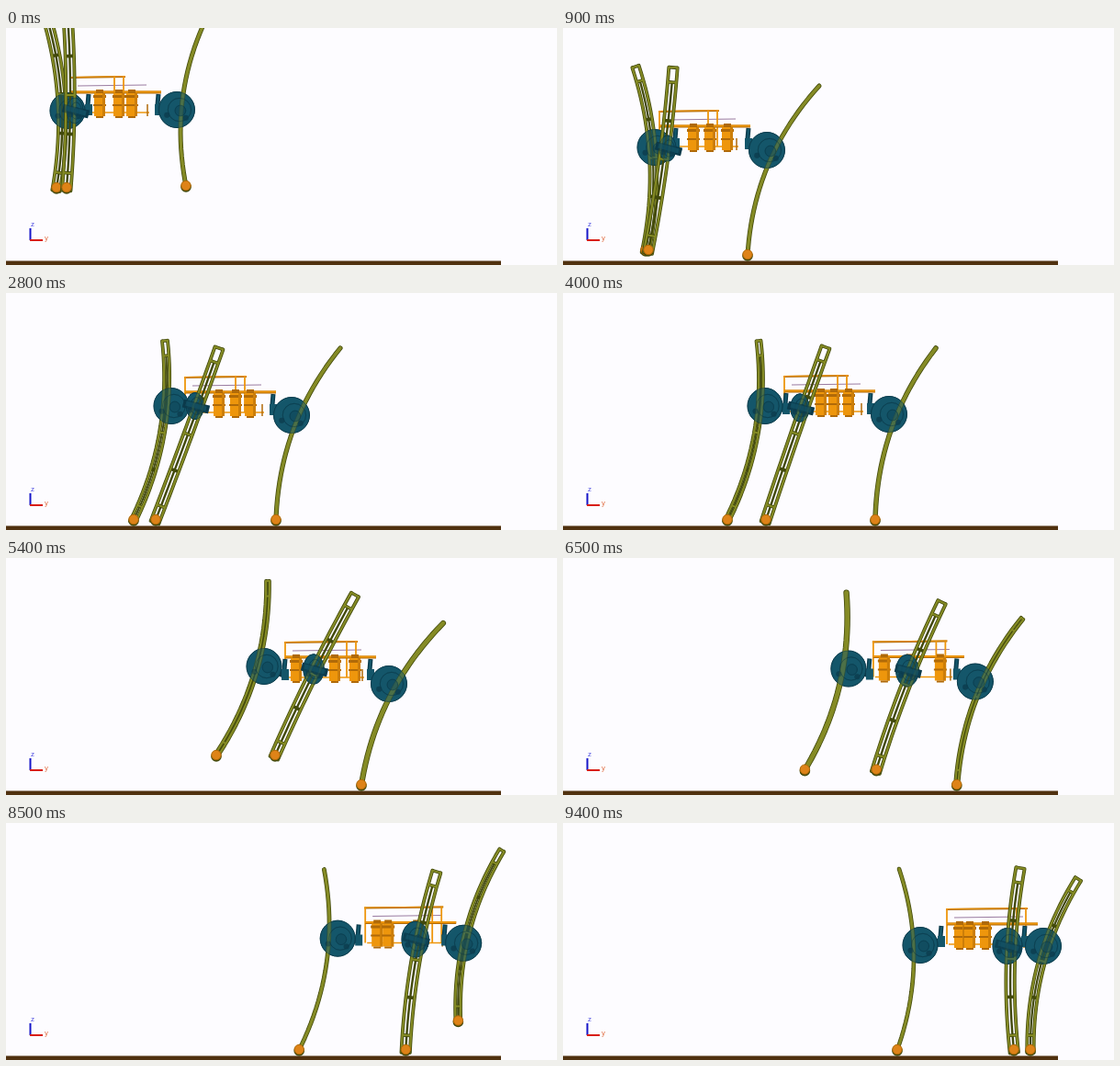
An HTML page with a canvas for the animation above (9.5 s loop, 600x258 px).

```html
<!DOCTYPE html>
<html>
<head>
<meta charset="utf-8">
<style>
html, body { margin: 0; width: 600px; height: 258px; overflow: hidden; background: #fdfcff; }
canvas { display: block; }
</style>
</head>
<body>
<canvas id="stage" width="600" height="258"></canvas>
<script>
const ctx = document.getElementById('stage').getContext('2d');
const LOOP = 9500, STEP = 100, GAIT = 1.2, GAIT_START = 2.8;
const ORANGE = '#ee960c', ORANGE_DARK = '#b06a08', TEAL = '#14566a', TEAL_DARK = '#0b3a4b';
const OLIVE = '#858b25', OLIVE_DARK = '#42490c';

// Poses at these seconds; the gait offsets fill in the strides between them.
const TIMES = [0, .9, 2.8, 4, 5.4, 7.6, 9.4];
const still = [0, 0, 0, 0, 0, 0];
const sway = [0, 26, 8, -20, -15, -7];
const hubSway = [0, 15, 6, -10, -10, -5];
const swingLift = [0, -32, -26, 0, 0, 0];
const hubBob = [0, -5, 3, 9, 4, 0];
const swingFootY = [174, 242, 247, 247, 215, 247, 247];

const legs = [
  { // rear
    topX: [[39, 79, 173, 213, 285, 329, 366], sway],
    topY: [[-28, 42, 52, 52, 25, 51, 50], swingLift],
    footX: [[55, 90, 139, 179, 229, 297, 364], [0, 4, 6, 6, -6, -8]],
    footY: [swingFootY, swingLift],
    hubX: [[67, 100, 180, 220, 281, 339, 389], hubSway],
    hubY: [[90, 130, 123, 123, 118, 124, 133], hubBob],
    bow: p => 13 + 4 * p, width: p => 12 - 8 * p, radius: () => 19
  },
  { // middle
    topX: [[66, 120, 232, 286, 380, 442, 498], sway],
    topY: [[-28, 43, 60, 59, 40, 57, 49], swingLift],
    footX: [[66, 93, 163, 221, 293, 392, 491], [0, 7, 24, 25, 10, 4]],
    footY: [swingFootY, swingLift],
    hubX: [[75, 114, 206, 258, 335, 413, 484], hubSway],
    hubY: [[90, 131, 123, 125, 121, 125, 134], hubBob],
    bow: p => 4 - 11 * p, width: () => 13, radius: p => 9 + 7 * p * p, bar: true
  },
  { // front
    topX: [[226, 279, 364, 406, 476, 521, 561], sway],
    topY: [[-26, 63, 60, 60, 71, 57, 61], [0, 11, 5, 0, -28, -24]],
    footX: [[196, 201, 294, 340, 387, 469, 509], [0, -4, -14, -22, -14, -2]],
    footY: [[172, 247, 247, 247, 247, 247, 247], [0, 0, 0, 0, -30, -26]],
    hubX: [[186, 222, 311, 355, 417, 479, 523], hubSway],
    hubY: [[89, 133, 133, 132, 137, 132, 134], [0, 5, 4, 2, -2, 0]],
    bow: p => -18 + 4 * p, width: p => 5 + 6 * p ** 3, radius: () => 19.5
  }
];
const body = {
  x: [[120, 155, 245, 291, 354, 420, 468], hubSway],
  y: [[70, 107, 108, 107, 108, 107, 110], still],
  rodEnd: [[10, 15, 17, 20, 29, 32, 38], still],
  motors: [
    [[-18, -13, -13, -10, -38, -38, -36], still],
    [[3, 5, 5, 4, 4, -25, -25], still],
    [[17, 24, 21, 20, 26, 20, -8], still]
  ]
};

function gait(offsets, t) {
  const u = (((t - GAIT_START) / GAIT) % 1 + 1) % 1 * 6;
  const i = Math.floor(u + 1e-6), f = u - i;
  const at = k => offsets[(i + k + 6) % 6];
  const [a, b, c, d] = [at(-1), at(0), at(1), at(2)];
  return b + f / 2 * (c - a + f * (2 * a - 5 * b + 4 * c - d + f * (3 * (b - c) + d - a)));
}

function value([poses, offsets], t, falling) {
  let i = 0;
  while (i < TIMES.length - 2 && t >= TIMES[i + 1]) i++;
  let f = (t - TIMES[i]) / (TIMES[i + 1] - TIMES[i]);
  if (falling && i === 0) f = Math.min(1, (t / .45) ** 2);
  const base = k => poses[k] - gait(offsets, TIMES[k]);
  return base(i) * (1 - f) + base(i + 1) * f + gait(offsets, t);
}

function line(points, width, color, cap = 'butt') {
  ctx.beginPath();
  for (const [x, y] of points) ctx.lineTo(x, y);
  ctx.lineWidth = width;
  ctx.strokeStyle = color;
  ctx.lineCap = cap;
  ctx.lineJoin = 'round';
  ctx.stroke();
}

function rect(x, y, w, h, color) {
  ctx.fillStyle = color;
  ctx.fillRect(x, y, w, h);
}

function ellipse(x, y, rx, ry, fill, stroke) {
  ctx.beginPath();
  ctx.ellipse(x, y, rx, ry, 0, 0, 7);
  if (fill) { ctx.fillStyle = fill; ctx.fill(); }
  if (stroke) { ctx.lineWidth = 1; ctx.strokeStyle = stroke; ctx.stroke(); }
}

function poseLeg(leg, t) {
  const p = t / 9.4, pose = { bow: leg.bow(p), width: leg.width(p), radius: leg.radius(p), bar: leg.bar };
  for (const key of ['topX', 'topY', 'footX', 'footY', 'hubX', 'hubY'])
    pose[key] = value(leg[key], t, key.endsWith('Y'));
  pose.footY = Math.min(247, pose.footY);
  return pose;
}

function drawHub(leg) {
  const { hubX: x, hubY: y, radius: r } = leg, ry = Math.min(19.5, r + 5);
  ellipse(x, y, r, ry, TEAL, TEAL_DARK);
  ellipse(x + r * .15, y, r * .65, ry * .65, null, TEAL_DARK);
  ellipse(x + r * .2, y + 1, r * .3, ry * .3, '#104a5d', TEAL_DARK);
  ellipse(x - r * .55, y + ry * .3, 3, 3, TEAL_DARK);
  ellipse(x + r * .5, y + ry * .45, 3, 3, TEAL_DARK);
  if (leg.bar) {
    line([[x - 13, y - 3], [x + 15, y + 4]], 9, TEAL_DARK);
    line([[x - 10, y - 3], [x + 12, y + 3]], 5, TEAL);
  }
}

function drawLeg(leg) {
  const { topX, topY, footX, footY, bow, width } = leg;
  const dx = footX - topX, dy = footY - topY, length = Math.hypot(dx, dy);
  const point = (s, side = 0) => {
    const b = bow * 4 * s * (1 - s), slope = bow * 4 * (1 - 2 * s);
    const tx = dx + slope * dy / length, ty = dy - slope * dx / length, n = Math.hypot(tx, ty);
    return [topX + dx * s + b * dy / length + side * ty / n,
            topY + dy * s - b * dx / length - side * tx / n];
  };
  const path = (side, from = 0, to = 1.015) =>
    Array.from({ length: 25 }, (_, i) => point(from + (to - from) * i / 24, side));
  const rail = (points, w) => {
    line(points, w, OLIVE_DARK, 'round');
    line(points, w - 1.6, OLIVE, 'round');
  };
  if (width < 6.5) {
    rail(path(0), Math.max(4.6, width));
  } else {
    const edge = width / 2 - 1.8;
    for (const s of [0, .08, .29, .5, .71, .92, 1.01])
      line([point(s, -edge), point(s, edge)], 3.6, OLIVE_DARK);
    line(path(0, .08, 1), Math.min(2.4, width / 5), OLIVE_DARK);
    rail(path(-edge), 3.8);
    rail(path(edge), 3.8);
    for (const s of [0, .08, .5, .92, 1.01])
      line([point(s, -edge), point(s, edge)], 2, OLIVE);
  }
  ellipse(footX, footY + 1, 5.8, 5.8, OLIVE_DARK);
  ellipse(footX, footY - .5, 5.2, 5.2, '#de8318', ORANGE_DARK);
}

function drawMotor(x, y) {
  rect(x - 4, y - 4, 8, 6, ORANGE_DARK);
  rect(x - 6, y, 12, 25, ORANGE);
  rect(x - 7, y + 2, 14, 3, ORANGE_DARK);
  rect(x - 7, y + 12, 14, 2, ORANGE_DARK);
  rect(x + 3, y, 3, 25, '#cc7e09');
  rect(x - 4, y + 25, 8, 2, ORANGE_DARK);
}

function drawBody(t) {
  const x = value(body.x, t), y = value(body.y, t, true), end = value(body.rodEnd, t);
  line([[x - 42, y - 7], [x + 33, y - 8]], 1, '#9a7ba0');
  line([[x - 51, y - 16], [x + end, y - 17]], 1.8, ORANGE_DARK);
  line([[x - 51, y - 16.5], [x + end, y - 17.5]], 1, ORANGE);
  for (const post of [x - 50, x + end - 12, x + end - 2])
    line([[post, y - 17], [post, y + 22]], 1.8, ORANGE);
  line([[x - 50, y], [x + 49, y]], 3, ORANGE_DARK);
  line([[x - 50, y - .5], [x + 49, y - .5]], 2, ORANGE);
  line([[x - 48, y + 22], [x + 36, y + 22]], 1.4, ORANGE);
  line([[x + 34, y + 13], [x + 34, y + 26]], 1.5, ORANGE_DARK);
  for (const motor of body.motors) drawMotor(x + value(motor, t), y + 1);
  return y;
}

function drawBracket(x, y, hub) {
  line([[x, y + 2], [x - 1, y + 14]], 5, TEAL_DARK);
  line([[x, y + 3], [x - 1, y + 14]], 2.5, TEAL);
  line([[x, y + 19], [hub.hubX, hub.hubY]], 8, TEAL_DARK);
  rect(x - 4, y + 13, 8, 12, TEAL);
}

function drawAxes() {
  line([[26.5, 218], [26.5, 231]], 2, '#1616c8');
  line([[26, 231], [40, 231]], 2, '#d81e14');
  ctx.font = '8px "Liberation Sans", sans-serif';
  ctx.fillStyle = '#4a4ae0';
  ctx.fillText('z', 27, 216);
  ctx.fillStyle = '#e2734a';
  ctx.fillText('y', 42, 231);
}

function draw(t) {
  rect(0, 0, 600, 258, '#fdfcff');
  rect(0, 253.5, 539, 4.5, '#50310f');
  drawAxes();
  const [rear, middle, front] = legs.map(leg => poseLeg(leg, t));
  const y = drawBody(t);
  drawBracket(rear.hubX + 23, y, rear);
  drawBracket(front.hubX - 20, y, front);
  for (const leg of [rear, front, middle]) {
    drawHub(leg);
    drawLeg(leg);
    ctx.globalAlpha = .5;
    drawHub(leg);
    ctx.globalAlpha = 1;
  }
}

const start = performance.now();
function tick() {
  const ms = (performance.now() - start) % LOOP;
  draw(Math.floor(ms / STEP) * STEP / 1000);
  requestAnimationFrame(tick);
}
tick();
</script>
</body>
</html>
```
